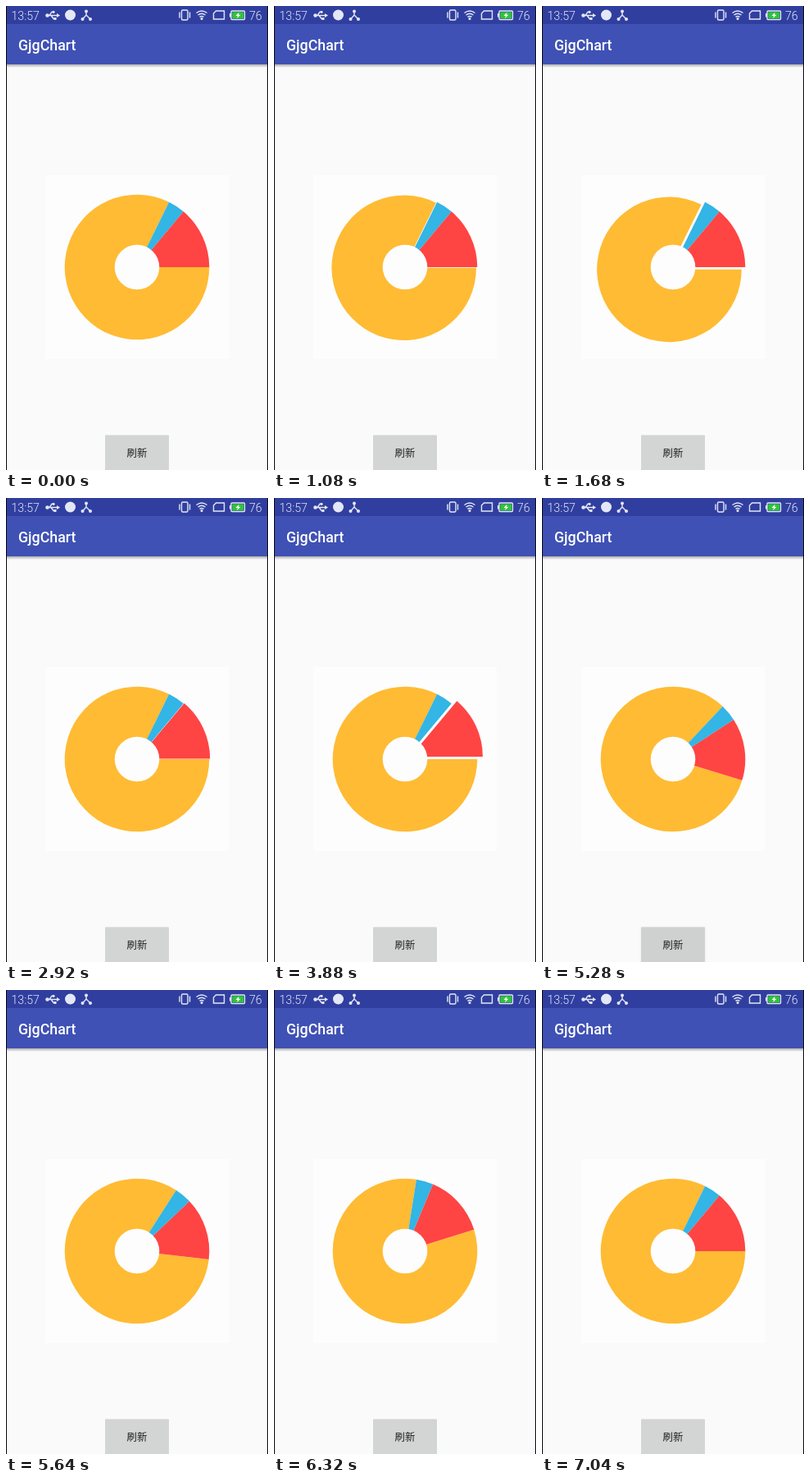
An HTML page for the animation above (7.52 s loop, 320 by 565 pixels).

```html
<!DOCTYPE html>
<html lang="zh">
<head>
<meta charset="utf-8">
<title>GjgChart</title>
<style>
html, body { margin: 0; width: 100%; height: 100%; overflow: hidden; background: #fafafb; }
svg { display: block; width: 320px; height: 565px; }
text { font-family: Roboto, sans-serif; }
</style>
</head>
<body>
<svg viewBox="0 0 320 565">
  <defs>
    <linearGradient id="shade" x2="0" y2="1">
      <stop stop-color="#000" stop-opacity=".32"/>
      <stop offset="1" stop-color="#000" stop-opacity="0"/>
    </linearGradient>
    <clipPath id="buttonClip"><rect x="121" y="522.5" width="78" height="50" rx="1"/></clipPath>
    <filter id="blur"><feGaussianBlur stdDeviation="1.2"/></filter>
  </defs>

  <rect width="320" height="565" fill="#fafafb"/>
  <rect y="71" width="320" height="4" fill="url(#shade)"/>
  <rect y="22" width="320" height="49" fill="#3f51b5"/>
  <rect width="320" height="22" fill="#303f9f"/>
  <text x="15" y="54" font-size="17.8" font-weight="500" fill="#fff">GjgChart</text>

  <!-- Status bar -->
  <g fill="#e4e7f6">
    <text x="6.5" y="17" font-size="14.2" font-weight="300">13:57</text>
    <text x="297" y="17" font-size="14.2" font-weight="300">76</text>
    <circle cx="78.5" cy="11" r="6.5"/>
    <circle cx="50.5" cy="11.5" r="2.3"/>
    <path d="M62 9l4 2.5-4 2.5z"/>
    <circle cx="58" cy="7.3" r="1.6"/>
    <rect x="58.5" y="14" width="3" height="3"/>
    <circle cx="98" cy="6.5" r="2"/>
    <circle cx="93.5" cy="16" r="2"/>
    <circle cx="103" cy="16" r="2"/>
    <circle cx="239" cy="15.5" r="1.5"/>
  </g>
  <g fill="none" stroke="#e4e7f6" stroke-width="1.4">
    <path d="M50 11.5H63M53 11.5L56 7.3H58M55 11.5L58 15.5H60"/>
    <path d="M98 6V11L93.5 16M98 11L103 16"/>
    <rect x="214.5" y="5" width="7.5" height="12" rx="1.5"/>
    <path d="M212 7.5V14.5M224.5 7.5V14.5"/>
    <path d="M232.5 8.5Q239 3.5 245.5 8.5M234.5 11Q239 7.5 243.5 11M236.5 13.4Q239 11.5 241.5 13.4"/>
    <path d="M256.5 6H266.5V16H253.5V9z"/>
    <rect x="275" y="6" width="16.5" height="10.5" rx="1"/>
  </g>
  <rect x="276.3" y="7.3" width="14" height="8" fill="#2fc43a"/>
  <rect x="273" y="9" width="1.7" height="4.5" fill="#e4e7f6"/>
  <path d="M284.5 7.8L280.5 12H283L282 15L286.5 10.7H284z" fill="#fff"/>

  <rect x="48" y="206" width="224" height="224" fill="#fdfdfd"/>
  <g id="pie"></g>
  <circle cx="160" cy="318" r="27.3" fill="#fdfdfd"/>

  <rect id="lift" x="120" y="522.5" width="80" height="50" fill="#777" filter="url(#blur)"/>
  <rect x="121" y="522.5" width="78" height="50" rx="1" fill="#d3d4d4"/>
  <circle id="ripple" cx="159" cy="540" fill="#000" clip-path="url(#buttonClip)"/>
  <text x="160" y="548.5" font-size="12.4" text-anchor="middle" fill="#202020" style="font-family:'Noto Sans CJK SC','Noto Sans CJK',sans-serif">刷新</text>

  <path d="M.5 0V565M319.5 0V565" stroke="#080810" stroke-width="1"/>
</svg>
<script>
const LOOP = 7520, STEP = 40, CX = 160, CY = 318, R = 88.3;
const byId = id => document.getElementById(id);
const point = (deg, r) => [Math.cos(deg * Math.PI / 180) * r, Math.sin(deg * Math.PI / 180) * r];

// Tables of [time, value], linear between rows; equal times make a jump.
const still = [[0, 0]];
const yellowOut = [[0, 0], [1080, 0], [1080, 1.5], [1680, 5.4], [2440, 9.6], [2760, 9.6], [2760, 0]];
const redOut = [[2760, 0], [2920, 1], [3880, 7.3], [4280, 10], [4880, 10], [4880, 0]];
const spin = [[4880, 0], [4960, 66.4], [5640, 726.5], [7040, 2160]];
const rippleSize = [[4760, 0], [4840, 16], [4960, 29.5], [5200, 52]];
const rippleAlpha = [[4760, 0], [4800, .07], [5080, .07], [5360, 0]];
const liftAlpha = [[4760, 0], [4880, .7], [5080, .7], [5300, 0]];

function valueAt(table, t) {
  const next = table.findIndex(row => row[0] > t);
  if (next === 0) return table[0][1];
  if (next < 0) return table[table.length - 1][1];
  const [t0, v0] = table[next - 1], [t1, v1] = table[next];
  return v0 + (v1 - v0) * (t - t0) / (t1 - t0);
}

const slices = [
  { from: 0, to: 296.3, color: '#ffbb33', out: yellowOut },
  { from: 296.3, to: 310, color: '#33b5e5', out: still },
  { from: 310, to: 360, color: '#ff4444', out: redOut }
];
for (const slice of slices) {
  const { from, to, color } = slice;
  slice.node = document.createElementNS('http://www.w3.org/2000/svg', 'path');
  slice.node.setAttribute('d', `M0 0L${point(from, R)}A${R} ${R} 0 ${+(to - from > 180)} 1 ${point(to, R)}Z`);
  slice.node.setAttribute('fill', color);
  byId('pie').append(slice.node);
}

function draw(t) {
  byId('pie').setAttribute('transform', `translate(${CX} ${CY}) rotate(${valueAt(spin, t) % 360})`);
  for (const { node, from, to, out } of slices) {
    node.setAttribute('transform', `translate(${point((from + to) / 2, valueAt(out, t))})`);
  }
  byId('ripple').setAttribute('r', valueAt(rippleSize, t));
  byId('ripple').setAttribute('opacity', valueAt(rippleAlpha, t));
  byId('lift').setAttribute('opacity', valueAt(liftAlpha, t));
}

const start = performance.now();
function tick() {
  const t = (performance.now() - start) % LOOP;
  draw(Math.floor(t / STEP) * STEP);
  requestAnimationFrame(tick);
}
tick();
</script>
</body>
</html>
```
